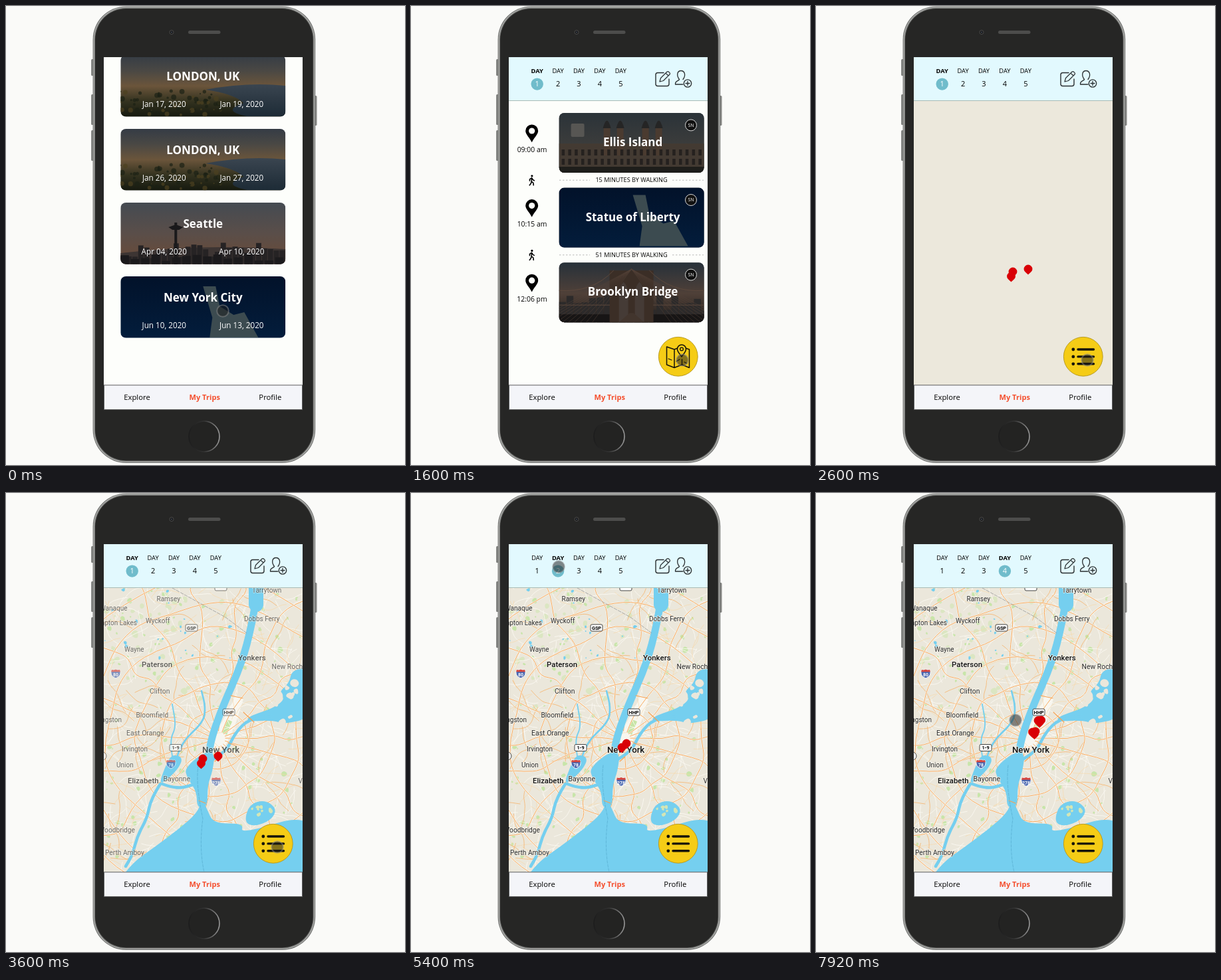
Recreate the animation shown at these times as an HTML page. Size 600 by 691 pixels, loop 8 s.

```html
<!DOCTYPE html>
<html lang="en">
<head>
<meta charset="utf-8">
<title>Trip planner</title>
<style>
html, body { margin: 0; width: 100%; height: 100%; overflow: hidden; background: #fafaf8; }
svg { display: block; }
text { font-family: "Open Sans", "Noto Sans", sans-serif; }
.map text { font-family: Roboto, sans-serif; }
</style>
</head>
<body>
<svg id="stage" width="600" height="691" viewBox="0 0 600 691"></svg>
<script>
const LOOP = 8000;
const stage = document.getElementById('stage');

let seed = 11;
const rnd = (a = 0, b = 1) => {
  seed = (seed * 16807) % 2147483647;
  return a + (b - a) * seed / 2147483647;
};
const each = (n, fn) => Array.from({ length: n }, (_, i) => fn(i)).join('');
const attrs = o => Object.entries(o).map(([k, v]) => `${k}="${v}"`).join(' ');
const rect = (x, y, w, h, fill, more = {}) =>
  `<rect x="${x}" y="${y}" width="${w}" height="${h}" fill="${fill}" ${attrs(more)}/>`;
const disc = (x, y, r, fill, more = {}) => `<circle cx="${x}" cy="${y}" r="${r}" fill="${fill}" ${attrs(more)}/>`;
const path = (d, fill, more = {}) => `<path d="${d}" fill="${fill}" ${attrs(more)}/>`;
const stroke = (d, color, width, more = {}) =>
  path(d, 'none', { stroke: color, 'stroke-width': width, 'stroke-linecap': 'round', 'stroke-linejoin': 'round', ...more });
const text = (s, x, y, size, more = {}) =>
  `<text x="${x}" y="${y}" font-size="${size}" ${attrs({ 'text-anchor': 'middle', ...more })}>${s}</text>`;
const group = (body, more = {}) => `<g ${attrs(more)}>${body}</g>`;
const at = (x, y, body, more = {}) => group(body, { transform: `translate(${x} ${y})`, ...more });
const gradient = (id, colors, vertical = true) =>
  `<linearGradient id="${id}" x2="${vertical ? 0 : 1}" y2="${vertical ? 1 : 0}">` +
  colors.map((c, i) => `<stop offset="${i / (colors.length - 1)}" stop-color="${c}"/>`).join('') + '</linearGradient>';
const clip = (id, shape) => `<clipPath id="${id}">${shape}</clipPath>`;

// Rounded line through the midpoints of a list of [x, y]
function curve(p, closed = false) {
  const n = p.length;
  const mid = (a, b) => [(a[0] + b[0]) / 2, (a[1] + b[1]) / 2].map(v => v.toFixed(1));
  if (closed) return `M${mid(p[n - 1], p[0])}` + p.map((q, i) => `Q${q} ${mid(q, p[(i + 1) % n])}`).join('') + 'Z';
  return `M${p[0]}` + p.slice(1, -1).map((q, i) => `Q${q} ${mid(q, p[i + 2])}`).join('') + `L${p[n - 1]}`;
}
const points = s => s.split(' ').map(q => q.split(',').map(Number));

const defs = `<defs>
  ${gradient('ring', ['#1c1c1c', '#333', '#999'], false)}
  ${gradient('dusk', ['#353c45', '#4a4844', '#6b553b', '#33321f', '#15190f'])}
  ${gradient('river', ['#3a4550', '#1d2b36'])}
  ${gradient('sunset', ['#454b52', '#5a4e49', '#6b4a36'])}
  ${gradient('night', ['#02122a', '#031d3c'])}
  ${gradient('steel', ['#2b3339', '#3b3c3b', '#2a2724'])}
  ${gradient('amber', ['#27313a', '#4f4038', '#1d1a18'])}
  ${clip('screen', rect(147, 77, 299, 531))}
  ${clip('mapArea', rect(147, 143, 299, 428))}
  ${clip('trip', rect(0, 0, 248, 92.5, '', { rx: 8 }))}
  ${clip('stop', rect(0, 0, 218, 90, '', { rx: 8 }))}
</defs>`;

// Phone: nested outlines from the rim inwards
const phone = [80, 133, 187].map(y => rect(128, y, 4.5, y > 80 ? 46 : 25, '#858684', { rx: 1.5 })).join('') +
  rect(463, 135, 4.5, 45, '#858684', { rx: 1.5 }) +
  ['#747573', '#b3b4b2', '#6a6b69', '#262625'].map((c, i) =>
    rect(130.6 + i * 1.2, .4 + i * 1.2, 334.6 - i * 2.4, 687.6 - i * 2.4, c, { rx: 50 - i * 1.2 })).join('') +
  disc(249, 39.5, 3, '#171717', { stroke: '#4c4c4c', 'stroke-width': 1 }) + disc(249, 39.5, 1, '#444c5c') +
  rect(274, 37, 48.5, 5, '#4d4d4c', { rx: 2.5 }) +
  disc(298, 648, 23, '#232322', { stroke: 'url(#ring)', 'stroke-width': 1.6 }) +
  rect(147, 77, 299, 531, '#fdfefb');

// Photo stand-ins
const fill = id => rect(0, 0, 248, 93, `url(#${id})`);
const skyline = (n, lo, hi, color, gap = 1) =>
  each(n, i => { const h = rnd(lo, hi), w = 248 / n; return rect(i * w, 93 - h, w - gap, h, color); });
const london = fill('dusk') +
  path('M128,52Q190,40 248,46V92H190Q150,84 185,72Q170,58 128,52Z', 'url(#river)') +
  each(70, () => disc(rnd(0, 150), rnd(54, 90), rnd(1, 4), rnd() < .3 ? '#4c4020' : '#1c2114', { opacity: .7 }));
const seattle = fill('sunset') + path('M0,76Q120,62 248,70V93H0Z', '#3d3533') +
  skyline(28, 9, 33, '#262324') + skyline(16, 4, 18, '#1b1a1c', 3) +
  rect(81, 30, 4, 63, '#1a191b') + path('M72,37L83,33 94,37 88,41H78Z', '#1a191b');
const figure = path('M124,15H143L149,45 170,58 186,54 207,92H134L138,62Z', '#3c4b50');
const harbor = fill('night') + figure;
const harborWide = fill('night') + at(-13, -4, figure);
const island = fill('steel') + rect(18, 16, 20, 20, '#575653', { rx: 2 }) + rect(0, 46, 218, 44, '#433a32') +
  [72, 92, 130, 150].map(x => rect(x - 5, 22, 10, 42, '#4a3b30') + path(`M${x - 6},23Q${x},0 ${x + 6},23Z`, '#252525')).join('') +
  each(44, i => rect(4 + (i >> 1) * 9.8, 55 + i % 2 * 14, 4.5, 9, '#25211f')) + rect(0, 81, 218, 9, '#1e1e1b');
const arch = x => path(`M${x - 7},90V46Q${x - 6},35 ${x},29Q${x + 6},35 ${x + 7},46V90Z`, '#453b36');
const bridge = fill('amber') + skyline(22, 20, 48, '#2c2a2a') + rect(0, 78, 218, 15, '#171515') +
  rect(76, 12, 66, 80, '#3b2e26') + arch(97) + arch(121) +
  stroke(each(11, i => `M109,10L${i * 9 - 40},90M109,10L${i * 9 + 168},90`), '#544238', .5) +
  stroke('M0,42Q50,46 82,12M218,42Q168,46 136,12M0,64H76M142,64H218', '#5c483c', 1) +
  path('M106,76H112L128,90H90Z', '#42352d');

// Trip list
const tripCard = ([title, from, to, photo], i) => at(172.3, 74 + i * 111,
  group(photo, { 'clip-path': 'url(#trip)' }) +
  group(text(title, 124, 37.7, 17, { 'font-weight': 700 }) +
    text(from, 65.5, 78, 11.7) + text(to, 182, 78, 11.7), { fill: '#fff' }));
const trips = group([
  ['LONDON, UK', 'Jan 17, 2020', 'Jan 19, 2020', london],
  ['LONDON, UK', 'Jan 26, 2020', 'Jan 27, 2020', london],
  ['Seattle', 'Apr 04, 2020', 'Apr 10, 2020', seattle],
  ['New York City', 'Jun 10, 2020', 'Jun 13, 2020', harbor]
].map(tripCard).join(''), { id: 'trips', 'clip-path': 'url(#screen)' });

// Itinerary
const marker = path('M0,13.2C-3,7 -9.5,1 -9.5,-4A9.5,9.5 0 0 1 9.5,-4C9.5,1 3,7 0,13.2Z', '#000') + disc(0, -4, 4.6, '#fdfefb');
const walker = disc(.4, -6.4, 1.6, '#000') +
  stroke('M0,-3L-.3,2 2.4,4.2 2.8,7.6M-.3,2L-1.2,5 -3.2,7.6M-.2,-3.4L-3,-1.4V1M.4,-3L2,-.4 3.8,.6', '#000', 1.6);
const stopRow = ([title, time, photo], i) => group(
  at(181.7, 192, marker) + text(time, 182, 219.6, 10.4) +
  at(222.6, 161, rect(0, 0, 218, 90, '#555554', { rx: 8 }) +
    group(photo, { id: 'photo' + i, 'clip-path': 'url(#stop)' }) +
    text(title, 111, 50, 17, { 'font-weight': 700, fill: '#fff' }) +
    disc(198.4, 18.4, 8.5, '#111', { stroke: '#d8d8d8', 'stroke-width': 1 }) +
    text('SN', 198.4, 20.9, 7, { fill: '#fff' })), { id: 'stop' + i });
const walkRow = (s, i) => group(
  stroke('M223,0H440', '#b9bab8', 1, { 'stroke-dasharray': '2.5 2.5', 'stroke-linecap': 'butt' }) +
  rect(269, -6, 124, 11, '#fdfefb') + text(s, 331.5, 2.8, 9.15) +
  at(181.5, 0, walker, { class: 'late' }), { id: 'walk' + i });
const plan = group(
  [['Ellis Island', '09:00 am', island], ['Statue of Liberty', '10:15 am', harborWide], ['Brooklyn Bridge', '12:06 pm', bridge]]
    .map(stopRow).join('') +
  ['15 MINUTES BY WALKING', '51 MINUTES BY WALKING'].map(walkRow).join(''), { id: 'plan' });

// Map: roads spread and circle around the city, water is laid on top
const WATER = '#75cfef', LAND = '#ebe7db';
const water = s => path(curve(points(s), true), WATER);
const river = (s, w) => stroke(curve(points(s)), WATER, w);
const polar = (x, y, r, a) => [x + r * Math.cos(a), y + r * Math.sin(a)].map(v => +v.toFixed(1));
const wander = (p, a, n, len) => {
  const list = [p];
  for (let i = 0; i < n; i++) list.push(p = polar(...p, len, a += rnd(-.5, .5)));
  return curve(list);
};
const blob = (x, y, r) =>
  curve(Array.from({ length: 6 }, (_, i) => polar(x, y, r * rnd(.5, 1.4), i * Math.PI / 3)), true);
const spoke = a => curve(Array.from({ length: 14 }, (_, i) => polar(318, 370, 12 + i * 24, a + rnd(-.09, .09))));
const belt = r => curve(Array.from({ length: 26 }, (_, i) => polar(318, 370, r * rnd(.94, 1.06), i * Math.PI / 13)), true);
const highways = [
  ...Array.from({ length: 18 }, (_, i) => spoke(i * Math.PI / 9)),
  ...Array.from({ length: 6 }, (_, i) => belt(45 + i * 40))
];
const anywhere = () => [rnd(147, 446), rnd(143, 560)];
const scatter = (n, steps, color, w) =>
  each(n, () => stroke(wander(anywhere(), rnd(0, 6.3), steps, 8), color, w));
const terrain = rect(147, 142, 299, 429, LAND) +
  each(170, () => path(blob(...anywhere(), rnd(1.2, 4.5)), '#c8e5aa')) +
  each(40, () => path(blob(rnd(147, 340), rnd(143, 340), rnd(3, 6)), '#dbe6c2')) +
  path('M306,395L322,350 346,305 357,310 346,345 328,385Z', '#f8f6ef') +
  path('M325,361L333,341 340,344 332,364Z', '#c7e5a6') +
  scatter(260, 5, '#fbf9f2', .9) + scatter(110, 5, '#f8d7a4', .6) + scatter(50, 7, '#f6b46c', .8) +
  highways.map(d => stroke(d, '#fbf9f2', 2) + stroke(d, '#f6a85c', 1)).join('') +
  each(22, () => path(blob(rnd(147, 340), rnd(143, 250), rnd(1, 3)), WATER)) +
  river('376,135 376,168', 22) + river('376,160 370,198 354,258 326,321 309,368 304,400', 11) +
  water('314,390 296,391 269,414 272,428 287,450 287,474 303,474 303,440 311,418') +
  water('295,462 287,482 262,504 225,532 188,558 160,600 470,600 470,478 352,514 358,497 312,498 302,475') +
  water('358,496 366,468 390,462 408,476 398,493 374,502') +
  water('460,262 430,266 426,286 410,300 420,310 402,324 365,336 362,344 400,342 420,348 460,338') +
  each(9, () => path(blob(rnd(405, 446), rnd(285, 345), rnd(3, 7)), LAND)) +
  each(8, () => path(blob(rnd(370, 400), rnd(470, 490), rnd(2, 4)), '#d3e5b5')) +
  river('311,401 331,390 344,362 365,340 400,336', 4.5) +
  water('250,393 266,398 260,414 241,433 230,438 241,408') +
  river('232,438 218,460 212,490 198,515 190,545 180,562', 4.5) + river('235,438 256,446 282,439', 4.5) +
  river('257,398 263,376 297,345 300,322 294,298', 2.6) + river('250,396 246,372 256,352 250,318', 1.8) +
  stroke('M290,463L300,467M314,404L322,397M334,376L347,381M338,305L356,309M357,330L373,345', '#f6a252', 1.1) +
  stroke('M250,143L330,187 362,211', '#9b9c9c', .8, { 'stroke-dasharray': '5 2' }) +
  stroke('M289,410Q285,440 296,490Q290,535 298,571', '#5ab0d2', .8, { 'stroke-dasharray': '4 2' });

const town = (s, x, y, size = 10, anchor = 'start') => text(s, x, y, size, {
  'text-anchor': anchor, 'font-weight': size > 11 ? 500 : 400, fill: size > 11 ? '#111' : '#2b2b2b',
  stroke: '#f5f2e9', 'stroke-width': 1.6, 'paint-order': 'stroke', 'stroke-linejoin': 'round'
});
const plate = (s, x, y) => rect(x - 9, y - 5, 18, 10, '#fff', { rx: 2, stroke: '#444', 'stroke-width': 1 }) +
  text(s, x, y + 2.7, 7.3, { 'font-weight': 600 });
const shield = (s, x, y) => at(x, y,
  path('M-6,-6Q-3,-5 0,-6.5Q3,-5 6,-6Q10,3 0,7Q-10,3 -6,-6Z', '#4a67b0', { stroke: '#fff', 'stroke-width': 1 }) +
  path('M-6,-6Q-3,-5 0,-6.5Q3,-5 6,-6L7,-2.8H-7Z', '#d6473f') +
  text(s, 0, 4, 7, { fill: '#fff', 'font-weight': 600 }));
const labels = [
  ['Tarrytown', 370, 150], ['Ramsey', 226.5, 163], ['Wanaque', 182.5, 176.5, 10, 'end'],
  ['Pompton Lakes', 197, 199, 10, 'end'], ['Wyckoff', 210, 196], ['Dobbs Ferry', 358, 193], ['Wayne', 178, 238.5],
  ['New Rochelle', 399.5, 264.5, 10.4], ['Clifton', 216, 301.5, 10.4], ['Livingston', 174, 345, 10, 'end'],
  ['Bloomfield', 195.5, 337.5, 10.2], ['East Orange', 181, 365, 10.5], ['Irvington', 174, 389], ['Union', 166, 413],
  ['Bayonne', 236.5, 433.5, 10.6], ['Woodbridge', 194, 510.5, 10.2, 'end'], ['Perth Amboy', 149, 545, 10.2],
  ['Valley Stream', 439.5, 436.5], ['Yonkers', 349, 251.5, 11.5], ['Paterson', 204, 261.5, 11.4],
  ['Elizabeth', 183, 437, 11.3], ['New York', 295, 391, 13.2]
].map(a => town(...a)).join('') +
  plate('GSP', 279, 203) + plate('HHP', 335, 330) + plate('1-9', 255, 383.5) + plate('', 323, 142) +
  disc(145, 396, 6, '#fff', { stroke: '#444' }) +
  shield('80', 165, 272) + shield('78', 248, 408) + shield('278', 316, 434.5);

const pin = ([x, y]) => at(x, y, path('M0,8.5C-2,6 -6.4,4 -6.4,0A6.4,6.4 0 1 1 6.4,0C6.4,4 2,6 0,8.5Z', '#d90006'));
const pinSets = ['296,400 293.5,407 319,396', '317,383 324,377', '313.6,370.5', '334,342.5 338.6,342 336.2,345 325.6,360 330,359 328.5,362.5']
  .map((s, i) => group(points(s).map(pin).join(''), { id: 'pins' + i })).join('');
const map = group(rect(147, 142, 299, 429, '#ece8dc') + group(terrain, { id: 'terrain' }) +
  group(labels, { id: 'labels' }) + pinSets, { id: 'map', class: 'map', 'clip-path': 'url(#mapArea)' });

// Header, round button, tabs
const INK = '#2a2f30', DARK = '#15130a';
const dayX = i => 189.7 + i * 31.4;
const header = group(rect(147, 77, 299, 65, '#e2f9fe') + rect(147, 142, 299, 1, '#a9bcb6') +
  disc(0, 117.6, 9.2, '#70bccb', { id: 'dayDot' }) +
  each(5, i => text('DAY', dayX(i), 101.2, 9.3, { id: 'day' + i }) + text(i + 1, dayX(i), 121.4, 11, { id: 'num' + i })) +
  stroke('M380,100.5H371Q368,100.5 368,103.5V117.5Q368,120.5 371,120.5H385Q388,120.5 388,117.5V110', INK, 1.4) +
  stroke('M374,114L375.5,108.5 385,99Q387,98 389,100.5Q390,102 389,103L379.5,112.5ZM383,101L387,105', INK, 1.2) +
  stroke('M409,118H397.5C397,112 403,113 403.5,110.5C399,105 400,97.5 406,97.5C412,97.5 413.5,105 409,110.5', INK, 1.3) +
  disc(416, 116.5, 5.7, '#e2f9fe', { stroke: INK, 'stroke-width': 1.3 }) +
  stroke('M413,116.5H419M416,113.5V119.5', INK, 1.3), { id: 'header' });
const mapIcon = stroke('M400,515.5L396,517 384.5,513V540L396,544.5 407.5,540 418.5,544.5V517L414,515.5M396,517V544.5M407.5,532V540', DARK, 1.5) +
  stroke('M407,528C404,523 400.5,521 400.5,516.5A6.5,6.5 0 0 1 413.5,516.5C413.5,521 410,523 407,528Z', DARK, 1.5) +
  disc(407, 516.5, 2.4, 'none', { stroke: DARK, 'stroke-width': 1.3 }) +
  stroke('M387,531L392,533M399,535L404,532M411,536L415,538', DARK, 1.2);
const listIcon = each(3, i => disc(386.8, 517 + i * 10.9, 2.4, DARK) + stroke(`M394,${517 + i * 10.9}H417.5`, DARK, 3.4));
const button = group(disc(401.8, 527.8, 29.4, '#f5cc16', { stroke: '#b89b20', 'stroke-width': 1 }) +
  group(mapIcon, { id: 'mapIcon' }) + group(listIcon, { id: 'listIcon' }), { id: 'button' });
const tabs = rect(147.5, 570.8, 298, 36.8, '#f4f5f9', { stroke: '#5c5d5e', 'stroke-width': 1 }) +
  text('Explore', 197, 593, 11.3, { 'font-weight': 500 }) +
  text('My Trips', 298.7, 593, 11.1, { 'font-weight': 700, fill: '#f4502f' }) +
  text('Profile', 397.3, 593, 11.3, { 'font-weight': 500 });
const pointer = disc(0, 0, 8.8, '#1c1c1c', { id: 'pointer', 'fill-opacity': .52, stroke: '#8c8c8c', 'stroke-opacity': .5, 'stroke-width': 2 });

stage.innerHTML = defs + phone + trips + plan + map + header + button + tabs + pointer;

const el = {};
stage.querySelectorAll('[id]').forEach(e => { el[e.id] = e; });
const walkers = stage.querySelectorAll('.late');
const show = (e, on) => e.setAttribute('display', on ? 'inline' : 'none');
const move = (e, x, y) => e.setAttribute('transform', `translate(${x} ${y})`);
const ramp = (t, a, b) => Math.min(1, Math.max(0, (t - a) / (b - a)));

// start, end, x, y
const moves = [[640, 1560, 408, 533], [3880, 4680, 222, 111], [5640, 5880, 249.3, 97], [6760, 7200, 287, 115], [7720, 7920, 300, 342]];

function pointerAt(t) {
  let x = 326, y = 459;
  for (const [a, b, tx, ty] of moves) {
    const k = 1 - (1 - ramp(t, a, b)) ** 3;
    x += (tx - x) * k;
    y += (ty - y) * k;
  }
  return [x, y];
}

function draw(t) {
  const planned = t >= 600, mapped = t >= 2320, settled = t >= 720;
  show(el.trips, t < 400);
  show(el.header, planned);
  show(el.button, planned);
  show(el.plan, planned && !mapped);
  show(el.map, t >= 2600);
  show(el.mapIcon, t >= 840 && !mapped);
  show(el.listIcon, t >= 2400);

  const pitch = settled ? 112.6 : 98.8;
  for (let i = 0; i < 3; i++) move(el['stop' + i], 0, i * pitch);
  for (let i = 0; i < 2; i++) move(el['walk' + i], 0, (settled ? 262.2 : 255) + i * pitch);
  walkers.forEach(w => show(w, settled));
  [1000, 1560, 1480].forEach((start, i) => show(el['photo' + i], t >= start));

  el.terrain.setAttribute('opacity', ramp(t, 2600, 2920));
  el.labels.setAttribute('opacity', ramp(t, 3360, 3720));

  const day = [5400, 6480, 7720].filter(start => t >= start).length;
  for (let i = 0; i < 4; i++) show(el['pins' + i], i === day);
  for (let i = 0; i < 5; i++) {
    el['day' + i].setAttribute('font-weight', i === day ? 700 : 400);
    el['num' + i].setAttribute('fill', i === day ? '#fff' : '#000');
  }
  el.dayDot.setAttribute('cx', dayX(day));
  move(el.pointer, ...pointerAt(t));
}

const begin = performance.now();
function frame() {
  const t = (performance.now() - begin) % LOOP;
  draw(Math.floor(t / 40) * 40);
  requestAnimationFrame(frame);
}
draw(0);
requestAnimationFrame(frame);
</script>
</body>
</html>
```
